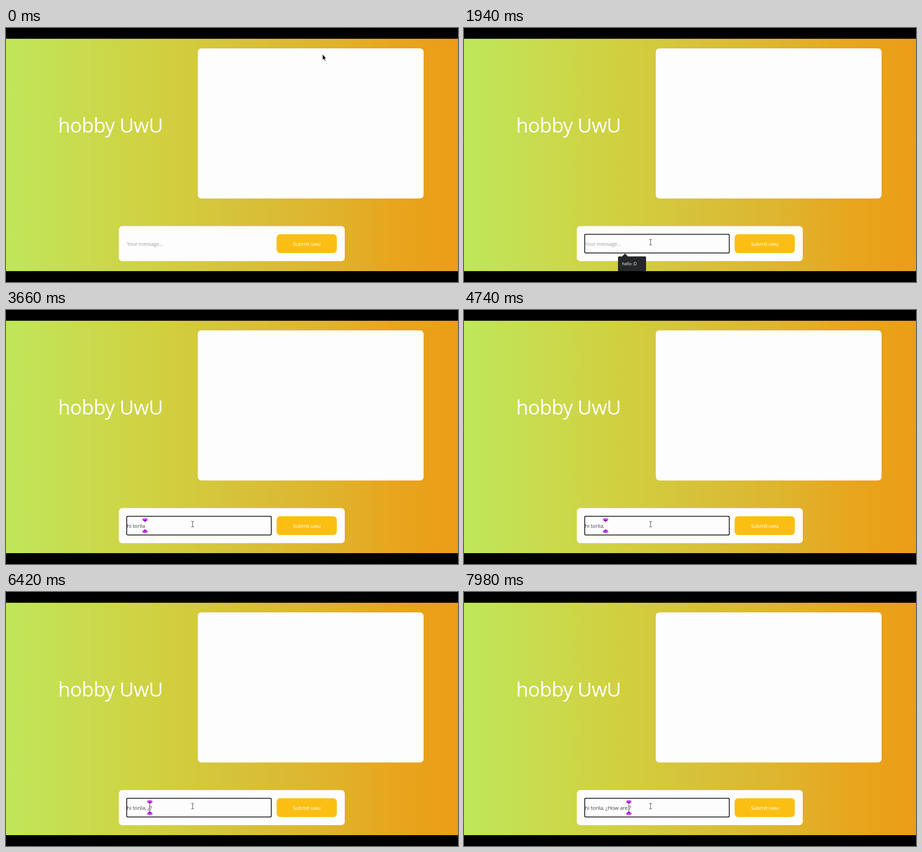
An HTML page for the animation above (8 s loop, 998x561 px).

```html
<!DOCTYPE html>
<html lang="en">
<head>
<meta charset="utf-8">
<title>hobby UwU</title>
<style>
  html, body { margin: 0; width: 100%; height: 100%; overflow: hidden; background: #000; }
  svg { display: block; width: 100%; height: 100%; }
  text { font: 11.5px "Open Sans", "Noto Sans", sans-serif; letter-spacing: -.3px; white-space: pre; }
  #title { font-size: 44px; letter-spacing: -.8px; fill: #fff; }
  #hint { fill: #9ca0a8; }
  #typed { fill: #3a3f48; letter-spacing: -.1px; }
  #tip text { font-size: 9.2px; letter-spacing: 0; fill: #fff; }
</style>
</head>
<body>
<svg viewBox="0 0 998 561">
  <defs>
    <linearGradient id="sky">
      <stop offset="0" stop-color="#bfe75a"/>
      <stop offset=".15" stop-color="#c8dc50"/>
      <stop offset=".33" stop-color="#d0d140"/>
      <stop offset=".5" stop-color="#d6c33b"/>
      <stop offset=".72" stop-color="#dfb32c"/>
      <stop offset=".86" stop-color="#e8a51d"/>
      <stop offset="1" stop-color="#ec9d17"/>
    </linearGradient>
    <clipPath id="page"><rect y="23.5" width="998" height="513.5"/></clipPath>
    <g id="cap">
      <ellipse cy="463" rx="6.2" ry="3.6" fill="#cf58f0"/>
      <path d="M-4.5 463.5H4.5L0 468.5Z" fill="#9a08c4"/>
    </g>
  </defs>
  <rect width="998" height="561"/>
  <g clip-path="url(#page)">
    <rect y="23.5" width="998" height="513.5" fill="url(#sky)"/>
    <text id="title" x="115" y="231">hobby UwU</text>
    <g fill="#fdfdfd">
      <rect x="423.5" y="45" width="498.5" height="331.5" rx="8"/>
      <rect x="249" y="437.5" width="499" height="77.5" rx="8"/>
    </g>
    <rect x="597.5" y="455.5" width="133" height="41.5" rx="8" fill="#fbbf13"/>
    <text x="664" y="481" text-anchor="middle" fill="#fff">Submit uwu</text>
    <rect id="ring" x="266.5" y="455.7" width="319.2" height="41.2" rx="2.5" fill="none" stroke="#111" stroke-width="1.8"/>
    <text id="hint" x="267" y="481">Your message...</text>
    <text id="typed" x="267" y="481"></text>
    <path id="caret" d="M0 469V484" stroke="#222"/>
    <g id="marker">
      <use href="#cap"/>
      <use href="#cap" transform="matrix(1 0 0 -1 0 952.5)"/>
    </g>
    <g id="tip">
      <path d="M340 541V506.500Q340 504.500 342 504.500H349L355.500 498L362 504.500H400Q402 504.500 402 506.500V541Z" fill="#25282a"/>
      <text x="349" y="524">hello :D</text>
    </g>
    <path id="arrow" d="M0 0V12.500L2.700 9.900L4.700 14.300L6.600 13.400L4.700 9.200H8Z" stroke="#fff" stroke-width=".6"/>
    <path id="beam" d="M-2.800-6H-1Q0-6 0-5Q0-6 1-6H2.800M0-5V5M-2.800 6H-1Q0 6 0 5Q0 6 1 6H2.800" fill="none" stroke="#333"/>
  </g>
</svg>
<script>
const LOOP = 8000, BLINK = 530, FOLLOW = 80, INPUT_X = 267;
const el = id => document.getElementById(id);
const show = (id, on) => { el(id).style.display = on ? '' : 'none'; };
const place = (id, x, y = 0) => el(id).setAttribute('transform', `translate(${x} ${y})`);
const typed = el('typed');

// Each key: time, character typed at the caret ('<' moves the caret left).
const keys = [
  [2200, 'h'], [2330, 'i'], [2460, ' '], [2600, 't'], [2740, 'o'], [2870, 'r'],
  [2960, 'i'], [3030, 'l'], [3115, 'a'], [3900, ','], [4100, ' '],
  [5200, '¿'], [5600, '?'], [6100, '<'],
  [6720, 'H'], [6850, 'o'], [6980, 'w'], [7110, ' '],
  [7280, 'a'], [7400, 'r'], [7530, 'e'], [7680, ' ']
];

function widthOf(text) {
  typed.textContent = text;
  return text ? typed.getComputedTextLength() : 0;
}

let before = '', after = '';
const states = keys.map(([time, key]) => {
  if (key === '<') {
    after = before.slice(-1) + after;
    before = before.slice(0, -1);
  } else before += key;
  return { time, text: before + after, x: INPUT_X + widthOf(before) };
});

const mouse = [[0, 699, 58], [100, 699, 58], [780, 655, 478], [880, 655, 478], [1350, 412, 473], [LOOP, 412, 473]];

function mouseAt(t) {
  const i = mouse.findIndex(p => p[0] > t);
  const [t0, x0, y0] = mouse[i - 1], [t1, x1, y1] = mouse[i];
  const u = (t - t0) / (t1 - t0), e = u * u * (3 - 2 * u);
  return [x0 + (x1 - x0) * e, y0 + (y1 - y0) * e];
}

function draw(t) {
  const done = states.filter(s => s.time <= t), state = done.at(-1);
  typed.textContent = state ? state.text : '';
  show('hint', !state);
  show('ring', t >= 1400);
  show('tip', t >= 1620 && !state);
  show('marker', state);
  show('caret', state && (t - state.time) % (2 * BLINK) < BLINK);
  if (state) {
    let x = INPUT_X, last = INPUT_X;
    for (const s of done) {
      x += (s.x - last) * (1 - Math.exp((s.time - t) / FOLLOW));
      last = s.x;
    }
    place('marker', x);
    place('caret', state.x);
  }
  const [x, y] = mouseAt(t), overInput = x < 586;
  show('arrow', !overInput);
  show('beam', overInput);
  place(overInput ? 'beam' : 'arrow', x, y);
}

const start = performance.now();
function frame() {
  draw((performance.now() - start) % LOOP);
  requestAnimationFrame(frame);
}
frame();
</script>
</body>
</html>
```
